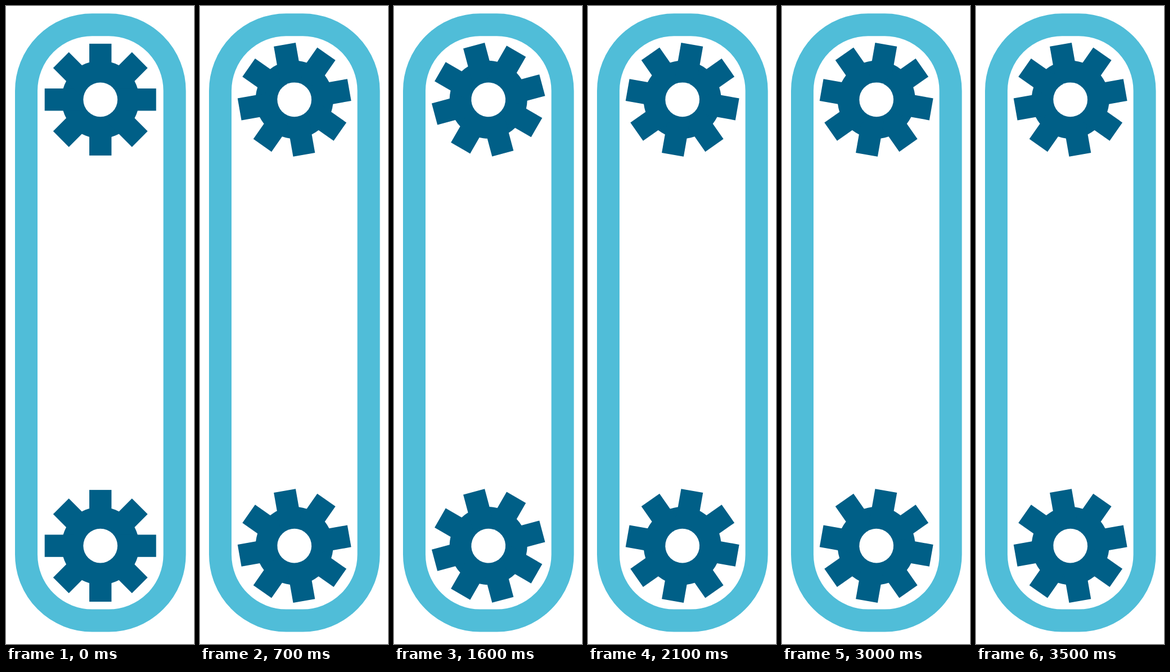
These frames come from a looping animation (334 px wide and 1130 px high, 3600 ms). An HTML page:

```html
<!DOCTYPE html>
<html lang="en">
<head>
<meta charset="utf-8">
<title>Belt and gears</title>
<style>
  html, body { margin: 0; width: 100%; height: 100%; overflow: hidden; background: #fff; }
  svg { display: block; width: 100%; height: 100%; }
</style>
</head>
<body>
<svg viewBox="0 0 334 1130">
  <defs>
    <g id="bar"><rect x="-19.7" y="-99" width="39.4" height="198"/></g>
    <g id="gear" fill="#005f87">
      <circle r="69"/>
      <use href="#bar"/>
      <use href="#bar" transform="rotate(45)"/>
      <use href="#bar" transform="rotate(90)"/>
      <use href="#bar" transform="rotate(135)"/>
      <circle r="30.4" fill="#fff"/>
    </g>
  </defs>
  <rect x="36" y="33.2" width="263.6" height="1055.3" rx="117" fill="none" stroke="#50bdd8" stroke-width="40"/>
  <g transform="translate(167.7 165.8)"><use class="wheel" href="#gear"/></g>
  <g transform="translate(167.7 956.1)"><use class="wheel" href="#gear"/></g>
</svg>
<script>
  const LOOP = 3600, TICK = 100, TURN = 5, REST = 13;
  const wheels = document.querySelectorAll('.wheel');

  function draw(ms) {
    const tick = Math.floor((ms % LOOP) / TICK);
    // The gears rest for one tick, then carry on.
    const angle = TURN * (tick >= REST ? tick - 1 : tick);
    for (const wheel of wheels) wheel.setAttribute('transform', `rotate(${angle})`);
  }

  const start = performance.now();
  function loop() {
    draw(performance.now() - start);
    requestAnimationFrame(loop);
  }
  loop();
</script>
</body>
</html>
```
